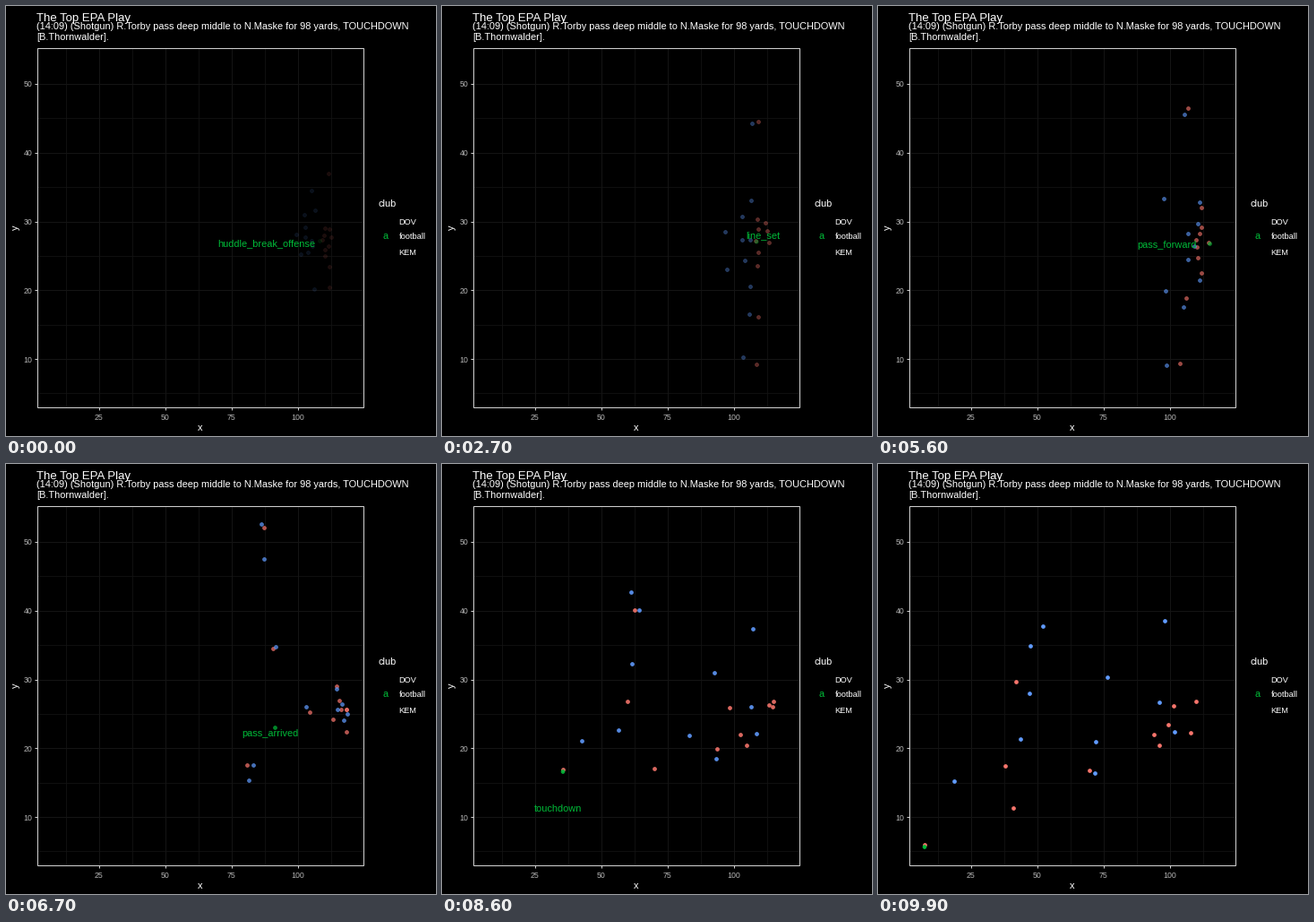
These frames come from a looping animation (480 by 480 pixels, 10 s). A matplotlib script:

```python
import numpy as np
import matplotlib.pyplot as plt
from matplotlib.animation import FuncAnimation
from matplotlib.colors import to_rgba
from matplotlib.patches import Rectangle

SIZE, FRAMES, INTERVAL = 480, 100, 100
LEFT, TOP, RIGHT, BOTTOM = 34, 46, 398, 447
RED, GREEN, BLUE = "#F8766D", "#00BA38", "#619CFF"
GRID, LINE, TICK_TEXT = "#141414", "#CCCCCC", "#B3B3B3"

plt.rcParams["font.family"] = "Liberation Sans"
plt.rcParams["toolbar"] = "None"

fig = plt.figure(figsize=(SIZE / 72, SIZE / 72), dpi=72, facecolor="black")
ax = fig.add_axes([0, 0, 1, 1])
ax.set_xlim(-0.5, SIZE - 0.5)
ax.set_ylim(SIZE - 0.5, -0.5)
ax.axis("off")


def px(x):
    return 103 + (x - 25) * 2.957


def py(y):
    return 393 - (y - 10) * 7.675


def line(xs, ys, color, width):
    ax.plot(xs, ys, color=color, lw=width, solid_capstyle="butt", zorder=1)


def write(x, y, text, size=11, color="white", **kw):
    return ax.text(x, y, text, size=size, color=color, va=kw.pop("va", "baseline"),
                   zorder=5, **kw)


# Panel
for v in np.arange(12.5, 120, 12.5):
    line([round(px(v))] * 2, [TOP, BOTTOM], GRID, 1.07 if v % 25 == 0 else 0.8)
for v in range(5, 55, 5):
    line([LEFT, RIGHT], [round(py(v))] * 2, GRID, 1.07 if v % 10 == 0 else 0.8)
for v in (25, 50, 75, 100):
    line([round(px(v))] * 2, [BOTTOM, BOTTOM + 3], LINE, 1.07)
    write(px(v), 461, str(v), 8.8, TICK_TEXT, ha="center")
for v in (10, 20, 30, 40, 50):
    line([LEFT - 3, LEFT], [round(py(v))] * 2, LINE, 1.07)
    write(29, py(v) + 4, str(v), 8.8, TICK_TEXT, ha="right")
ax.add_patch(Rectangle((LEFT, TOP), RIGHT - LEFT, BOTTOM - TOP, fill=False,
                       ec=LINE, lw=1.07, zorder=4))

# Titles and legend
write(33.5, 17, "The Top EPA Play", 13.2)
write(34, 26, "(14:09) (Shotgun) R.Torby pass deep middle to N.Maske for 98 yards, TOUCHDOWN")
write(34, 37, "[B.Thornwalder].")
write(216, 473, "x", ha="center")
write(10, 247, "y", ha="center", va="center", rotation=90)
write(415, 223, "club")
for y, name in ((243, "DOV"), (260, "football"), (277, "KEM")):
    write(438, y, name, 9.2)
write(423, 260, "a", color=GREEN, ha="center")

# Motion
KEYS = [0, 27, 43, 56, 67, 86, 99]
colors, paths = [], []


def spline(times, points, still=()):
    """Cubic Hermite path sampled at every frame; at rest at the still times."""
    t, p = np.array(times, float), np.array(points, float)
    m = np.gradient(p, t, axis=0)
    m[np.isin(t, still)] = 0
    f = np.arange(FRAMES)
    k = np.clip(np.searchsorted(t, f, side="right") - 1, 0, len(t) - 2)
    h = (t[k + 1] - t[k])[:, None]
    u = (f - t[k])[:, None] / h
    return ((2 * u**3 - 3 * u**2 + 1) * p[k] + (u**3 - 2 * u**2 + u) * h * m[k]
            + (3 * u**2 - 2 * u**3) * p[k + 1] + (u**3 - u**2) * h * m[k + 1])


def player(color, *points, extra=None):
    times, pts = list(KEYS), [np.array(p, float) for p in points]
    if extra:
        times.insert(5, extra[0])
        pts.insert(5, np.array(extra[1], float))
    # most of the way to the line is covered early
    times.insert(1, 11)
    pts.insert(1, pts[0] + 0.82 * (pts[1] - pts[0]))
    colors.append(color)
    paths.append(spline(times, pts, still=(27, 43)))
    return paths[-1]


# Offence
player(RED, (360, 187), (353, 129), (353, 130), (346, 114), (288, 71), (215, 163), (154, 243))
player(RED, (361, 291), (353, 347), (353, 348), (344, 326), (298, 206), (207, 265), (142, 337))
player(RED, (363, 258), (363, 251), (363, 251), (356, 269), (339, 277), (237, 340), (151, 384))
player(RED, (356, 248), (352, 238), (352, 237), (361, 225), (369, 248), (370, 265), (355, 265))
player(RED, (361, 249), (361, 242), (361, 242), (361, 247), (372, 264), (365, 269), (330, 270))
player(RED, (355, 256), (353, 249), (353, 250), (359, 254), (380, 274), (369, 271), (349, 300))
player(RED, (353, 261), (350, 262), (350, 263), (355, 261), (374, 274), (321, 272), (324, 291))
player(RED, (356, 272), (353, 275), (353, 275), (357, 281), (365, 285), (307, 318), (236, 342))
player(RED, (356, 279), (352, 290), (352, 292), (361, 298), (380, 299), (340, 314), (314, 314))
passer = player(RED, (360, 268), (365, 264), (363, 262), (369, 264), (380, 274), (333, 302),
                (308, 302))
runner = player(RED, (361, 314), (351, 400), (351, 398), (337, 399), (269, 336), (135, 341),
                (52, 425), extra=(73, (228, 320)))

# Defence
player(BLUE, (341, 206), (346, 131), (345, 129), (342, 121), (285, 67), (211, 143), (184, 181))
player(BLUE, (324, 255), (316, 252), (312, 258), (319, 215), (288, 106), (220, 163), (170, 203))
player(BLUE, (337, 275), (343, 344), (345, 346), (341, 336), (301, 204), (212, 223), (169, 256))
player(BLUE, (329, 277), (318, 294), (321, 300), (321, 318), (276, 336), (197, 297), (159, 307))
player(BLUE, (344, 316), (336, 392), (331, 398), (322, 401), (271, 353), (156, 309), (85, 354))
player(BLUE, (345, 228), (345, 217), (347, 218), (359, 219), (369, 251), (304, 233), (256, 238))
player(BLUE, (333, 233), (335, 235), (345, 236), (357, 243), (375, 268), (347, 184), (320, 175))
player(BLUE, (334, 247), (335, 261), (338, 262), (346, 254), (370, 274), (345, 271), (314, 266))
player(BLUE, (341, 262), (344, 261), (347, 262), (353, 268), (381, 279), (351, 301), (331, 299))
player(BLUE, (334, 258), (338, 284), (343, 286), (346, 283), (335, 271), (276, 303), (243, 310))
player(BLUE, (342, 268), (344, 313), (345, 313), (359, 306), (377, 286), (306, 329), (242, 345))

# Ball: on the ground, in the passer's hands, in the air, carried
CATCH = 73
ball = spline([0, 43, 47, 56, 67, CATCH, 99],
              [(350, 262), (351, 263), passer[47], (370, 265), (300, 294),
               runner[CATCH], runner[99]], still=(0, 43))
ball[47:56] = passer[47:56] + (0.5, 0.5)
ball[CATCH:] = runner[CATCH:] + (-0.5, 2)
colors.append(GREEN)
paths.append(ball)

tracks = np.array(paths)
rgba = np.array([to_rgba(c) for c in colors])

# frame: (centre x, baseline y, event)
EVENTS = {
    0: (290, 268, "huddle_break_offense"),
    27: (357.5, 259, "line_set"),
    43: (341, 277, "ball_snap"),
    56: (322, 270, "pass_forward"),
    67: (294, 304, "pass_arrived"),
    86: (128.5, 388, "touchdown"),
}

dots = ax.scatter(tracks[:, 0, 0], tracks[:, 0, 1], s=3.9**2, linewidths=0.71, zorder=3)
label = write(0, 0, "", 11.04, GREEN, ha="center")


def draw(i):
    rgba[:, 3] = min(1.0, 0.1 + 0.9 * (i / (FRAMES - 1)))
    dots.set_offsets(tracks[:, i])
    dots.set_facecolor(rgba)
    dots.set_edgecolor(rgba)
    x, y, event = EVENTS.get(i, (0, 0, ""))
    label.set_position((x, y))
    label.set_text(event)
    return dots, label


anim = FuncAnimation(fig, draw, frames=FRAMES, interval=INTERVAL, repeat=True, repeat_delay=0)
plt.show()
```
